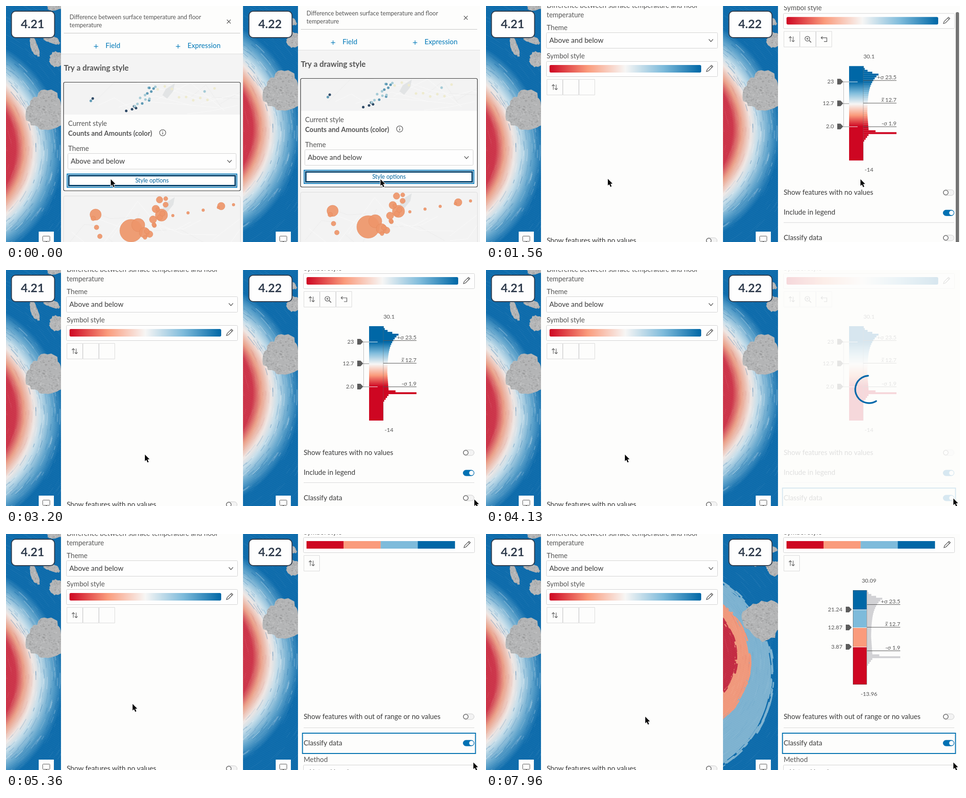
Recreate the animation shown at these times as an HTML page with a canvas. Size 1000 by 500 pixels, loop 8000 ms.

```html
<!DOCTYPE html>
<html lang="en">
<head>
<meta charset="utf-8">
<title>Style options comparison</title>
<style>
html, body { margin: 0; width: 100%; height: 100%; overflow: hidden; background: #fdfdfd; }
canvas { display: block; width: 1000px; height: 500px; }
</style>
</head>
<body>
<canvas id="stage" width="1000" height="500"></canvas>
<script>
const LOOP = 8000, TAU = Math.PI * 2;
const FONT = 'Lato, "Open Sans", sans-serif';
const INK = '#3a3a3a', SOFT = '#555', BLUE = '#0079b8', PAPER = '#fdfdfc';
const CLASSES = ['#ce0622', '#fa9b7c', '#7ebbdb', '#0067a6'];
const RAMP = ['#ce0622', '#fa9b7c', '#f7f6f5', '#7ebbdb', '#0067a6'];

let g = document.getElementById('stage').getContext('2d');

const clamp = v => Math.max(0, Math.min(1, v));
const span = (t, a, b) => clamp((t - a) / (b - a));
const mix = (a, b, p) => a + (b - a) * p;
const ease = p => p * p * (3 - 2 * p);
const easeOut = p => 1 - (1 - p) ** 3;

function rng(seed) {
  return () => {
    seed = (seed + 0x6D2B79F5) | 0;
    let v = Math.imul(seed ^ (seed >>> 15), 1 | seed);
    v = (v + Math.imul(v ^ (v >>> 7), 61 | v)) ^ v;
    return ((v ^ (v >>> 14)) >>> 0) / 4294967296;
  };
}

// ---- drawing helpers ----
function text(s, x, y, size, color = SOFT, align = 'left', weight = 400) {
  g.font = `${weight} ${size}px ${FONT}`;
  g.fillStyle = color;
  g.textAlign = align;
  g.fillText(s, x, y + size * 0.35);
}

function rect(x, y, w, h, fill) {
  g.fillStyle = fill;
  g.fillRect(x, y, w, h);
}

function box(x, y, w, h, stroke, width = 1, radius = 2, fill) {
  g.beginPath();
  g.roundRect(x, y, w, h, radius);
  if (fill) { g.fillStyle = fill; g.fill(); }
  if (stroke) { g.strokeStyle = stroke; g.lineWidth = width; g.stroke(); }
}

function trace(points) {
  g.beginPath();
  for (let i = 0; i < points.length; i += 2) g.lineTo(points[i], points[i + 1]);
}

function line(points, color, width = 1, closed = false) {
  trace(points);
  if (closed) g.closePath();
  g.strokeStyle = color;
  g.lineWidth = width;
  g.stroke();
}

function shape(points, fill) {
  trace(points);
  g.fillStyle = fill;
  g.fill();
}

function arc(x, y, r, from, to, color, width) {
  g.beginPath();
  g.arc(x, y, r, from, to);
  g.strokeStyle = color;
  g.lineWidth = width;
  g.stroke();
}

function disc(x, y, r, fill) {
  g.beginPath();
  g.arc(x, y, r, 0, TAU);
  g.fillStyle = fill;
  g.fill();
}

const ring = (x, y, r, color, width = 1) => arc(x, y, r, 0, TAU, color, width);

function gradient(x0, y0, x1, y1) {
  const grad = g.createLinearGradient(x0, y0, x1, y1);
  RAMP.forEach((c, i) => grad.addColorStop(i / 4, c));
  return grad;
}

function at(x, y, draw) {
  g.save();
  g.translate(x, y);
  draw();
  g.restore();
}

function clipped(x, y, w, h, draw, radius = 0) {
  g.save();
  g.beginPath();
  g.roundRect(x, y, w, h, radius);
  g.clip();
  draw();
  g.restore();
}

// ---- globe strip ----
function land(cx, cy, rx, ry, tilt, rand) {
  const pts = [], phase = rand() * TAU;
  for (let a = 0; a < TAU; a += 0.16) {
    const r = 0.92 + 0.1 * Math.sin(3 * a + phase) + (rand() - 0.5) * 0.16;
    pts.push(rx * r * Math.cos(a), ry * r * Math.sin(a));
  }
  at(cx, cy, () => {
    g.rotate(tilt);
    shape(pts, '#b4b5b6');
    g.clip();
    for (let i = 0; i < rx * ry * 0.3; i++) {
      const v = rand() < 0.55 ? 225 : 105;
      rect((rand() * 2 - 1) * rx, (rand() * 2 - 1) * ry, 1 + rand() * 3, 1 + rand() * 2, `rgba(${v},${v},${v},.2)`);
    }
  });
}

// A flat class area whose edge is frayed along the ring.
function classDisc(cx, cy, r, fray, color, rand) {
  disc(cx, cy, r, color);
  for (let i = 0; i < 90; i++) {
    const a = mix(-1.2, 1.2, rand());
    arc(cx, cy, r + fray * (rand() - 0.3), a, a + 0.02 + rand() * 0.12, color, 1.5 + rand() * 3);
  }
}

function makeMap(classed) {
  const c = document.createElement('canvas'), stage = g, rand = rng(7);
  c.width = 116;
  c.height = 541;
  g = c.getContext('2d');
  const ocean = '#0d6bab';
  rect(0, 0, 116, 541, ocean);
  if (classed) {
    classDisc(-123, 338, 224, 10, '#7db2d0', rand);
    classDisc(-98, 311, 153, 5, '#f0987b', rand);
    classDisc(-91, 301, 116, 8, '#c32a42', rand);
  } else {
    const grad = g.createRadialGradient(-130, 299, 0, -130, 305, 252);
    const stops = { 0: '#c4213d', 150: '#cc3449', 168: '#ea9f88', 189: '#efe6e3', 203: '#c6deea', 228: '#5fa3cb', 252: ocean };
    for (const r in stops) grad.addColorStop(r / 252, stops[r]);
    rect(0, 0, 116, 541, grad);
  }
  // Current-like streaks that follow the rings.
  for (let i = 0; i < 1300; i++) {
    const r = mix(130, 400, rand()), a = mix(-1.2, 1.2, rand());
    const halo = !classed && r > 186 && r < 245;
    const alpha = rand() * (halo ? 0.3 : 0.1);
    const tint = rand() < 0.5 ? '255,255,255' : r < 186 ? '170,60,70' : '10,95,160';
    arc(-130, 305, r, a, a + 0.03 + rand() * 0.12, `rgba(${tint},${alpha})`, halo ? 1.6 : 1);
  }
  for (let y = -60; y < 541; y += 4) line([0, y + 60, 116, y], 'rgba(255,255,255,.045)');
  land(84, 223, 44, 45, 0, rand);
  land(109, 113, 20, 17, 0, rand);
  land(60, 86, 8, 25, -0.35, rand);
  land(102, 2, 18, 8, 0, rand);
  land(97, 72, 20, 8, 0.3, rand);
  g = stage;
  return c;
}

const smoothMap = makeMap(false), classMap = makeMap(true);

function strip(X, shift, label, blend) {
  clipped(X, 0, 116, 500, () => {
    g.drawImage(smoothMap, X, -shift);
    g.globalAlpha = blend;
    g.drawImage(classMap, X, -shift);
  });
  const bx = X ? X + 12 : 11;
  box(bx + 0.5, 11, 91, 56, '#2e3b4c', 2, 9, '#fefefe');
  text(label, bx + 45, 38, 25, '#303c4d', 'center', 700);
  rect(X + 69, 478, 32, 22, '#fefefe');
  box(X + 77.5, 487.5, 15, 11, '#555', 1, 1);
  rect(X + 84, 498, 2, 2, '#555');
}

// ---- small parts ----
function select(x, y, w, label) {
  box(x + 0.5, y + 0.5, w - 1, 33, '#d2d2d2', 1, 2, '#fefefe');
  text(label, x + 6.5, y + 16.5, 15, INK);
  const cx = x + w - 14.5, cy = y + 17;
  line([cx - 4.5, cy - 2.5, cx, cy + 2.5, cx + 4.5, cy - 2.5], '#555', 1.2);
}

function toggle(x, y, on) {
  box(x + 0.5, y - 6, 23, 12, on ? '#006aab' : '#cdcdcd', 1, 6, on ? '#0071b3' : '#f3f3f3');
  disc(x + (on ? 18 : 6), y, 4.8, '#fff');
  if (!on) ring(x + 6, y, 5, '#707070', 1.5);
}

function pencil(x, y) {
  at(x, y, () => {
    g.rotate(Math.PI / 4);
    line([-2, -8, 2, -8, 2, 5, 0, 9, -2, 5], '#444', 1.1, true);
    line([-2, -5.5, 2, -5.5], '#444');
  });
}

function sortIcon() {
  for (const d of [1, -1]) {
    line([-3 * d, 5.5 * d, -3 * d, -5.5 * d], '#555', 1.1);
    line([-6 * d, -2.5 * d, -3 * d, -5.5 * d, 0, -2.5 * d], '#555', 1.1);
  }
}

function zoomIcon() {
  ring(-1, -1, 5, '#555', 1.2);
  line([3, 3, 7, 7], '#555', 1.6);
  rect(-3.5, -1.5, 5, 1, '#555');
  rect(-1.5, -3.5, 1, 5, '#555');
}

function undoIcon() {
  line([-3, -6, -6, -3, -3, 0], '#555', 1.2);
  line([-6, -3, 6, -3, 6, 5, 0, 5], '#555', 1.2);
}

function pointer(x, y, points, fill, edge, width) {
  at(x, y, () => {
    g.lineJoin = 'round';
    line(points, edge, width, true);
    shape(points, fill);
  });
}

const arrow = (x, y) =>
  pointer(x, y, [0, 0, 0, 14, 3.1, 11.3, 5.6, 16.8, 8, 15.7, 5.6, 10.3, 9.9, 10], '#0a0a0a', '#fff', 2);
const hand = (x, y) =>
  pointer(x, y, [-3, 1, 0, 1, 0.5, 6, 5, 7, 7.5, 9, 5.5, 16, -2, 16, -6.5, 9.5, -2.5, 11], '#fff', '#111', 2.2);

// ---- first panel ----
function cardMap(y, h, seed, marks) {
  const rand = rng(seed);
  clipped(122, y, 372, h, () => {
    rect(122, y, 372, h, '#f3f3f3');
    for (let i = 0; i < 12; i++) {
      const x = 122 + rand() * 372, w = 60 + rand() * 100;
      line([x, y + rand() * h, x + w / 2, y + rand() * h, x + w, y + rand() * h], i % 3 ? '#fafafa' : '#ececec');
    }
    shape([330, y + 27, 337, y + 14, 356, y + 2, 353, y + 18, 340, y + 34], '#e2e4e5');
    marks(rand);
  });
}

function dots(rand) {
  const dot = (x, y, c) => disc(x, y, 2.7, c);
  dot(183, 196, '#2f4a66');
  dot(179, 201, '#5f9ab5');
  dot(419, 181, '#a5cbd6');
  for (let i = 0; i < 20; i++) {
    const p = i / 19;
    dot(mix(246, 305, p) + rand() * 22, mix(228, 168, p) + (rand() - 0.5) * 14,
      p < 0.3 ? '#2f4a66' : rand() < 0.6 ? '#5f9ab5' : '#a5cbd6');
  }
  for (let i = 0; i < 9; i++) dot(mix(320, 440, i / 8), mix(170, 206, rand()), '#eeebcf');
}

const BUBBLES = [[264, 476, 24], [279, 464, 14], [292, 480, 11], [189, 442, 12], [328, 443, 13], [316, 430, 8], [454, 424, 8]];

function bubbles(rand) {
  const bubble = (x, y, r) => {
    disc(x, y, r, 'rgba(238,150,106,.92)');
    ring(x, y, r, 'rgba(222,132,88,.6)', 0.8);
  };
  for (const b of BUBBLES) bubble(...b);
  for (let i = 0; i < 12; i++) bubble(mix(283, 325, i / 11) + rand() * 22, mix(492, 408, i / 11) + (rand() - 0.5) * 12, 4 + rand() * 4);
  for (let i = 0; i < 5; i++) bubble(mix(352, 480, i / 4), mix(444, 421, i / 4), 3);
  for (let i = 0; i < 3; i++) bubble(184 + i * 7, mix(450, 488, i / 2), 5);
}

function stylePanel() {
  rect(116, -20, 384, 540, '#f4f4f4');
  rect(116, -20, 384, 121, PAPER);
  text('Difference between surface temperature and floor', 134, 24, 12.6);
  text('temperature', 134, 41, 12.6);
  for (const d of [4, -4]) line([470 - d, 29, 470 + d, 37], '#555', 1.1);
  rect(122, 57, 372, 1, '#c4c4c4');
  for (const [x, label] of [[190, 'Field'], [363, 'Expression']]) {
    rect(x - 4.5, 85, 9, 1.2, BLUE);
    rect(x - 0.6, 81, 1.2, 9, BLUE);
    text(label, x + 20, 84, 14.7, BLUE);
  }
  rect(116, 101, 384, 1, '#dedede');
  text('Try a drawing style', 122, 131, 16.4, SOFT, 'left', 700);

  box(121.5, 161.5, 373, 230, null, 1, 3, PAPER);
  cardMap(162, 68, 3, dots);
  box(121.5, 161.5, 373, 230, '#333', 1.2, 3);
  text('Current style', 131, 249, 14.4);
  text('Counts and Amounts (color)', 131, 270, 14.4, SOFT, 'left', 700);
  ring(330.5, 268.5, 6.5, '#444', 1.1);
  rect(330, 267.5, 1.2, 4.5, '#444');
  rect(330, 264.5, 1.2, 1.4, '#444');
  text('Theme', 131, 302, 14.6);
  select(130, 312, 356, 'Above and below');
  box(129, 356, 358, 28, '#1580bd', 2, 0, '#fff');
  box(132.5, 359.5, 351, 21, '#05426c', 3, 0, '#fff');
  text('Style options', 308, 370, 12.4, '#00639c', 'center');

  cardMap(403, 120, 11, bubbles);
  box(121.5, 402.5, 373, 130, '#dcdcdc', 1, 3);
}

// ---- options panel ----
function binWidth(i) {
  if (i > 39) return 0;
  if (i > 35) return 14 - 3 * (i - 35);
  const top = i < 4 ? 32 * (i / 4) ** 2 + 1 : 8 + 24 * Math.exp((4 - i) / 5);
  return Math.max(top + 3 * span(i, 24, 33), 70 * Math.exp(-((i - 35) ** 2)));
}

function histogram(y0, classed) {
  const x = classed ? 274 : 266, end = x + 100, knob = classed ? 259 : 241;
  text(classed ? '30.09' : '30.1', 308, y0 - 20, 12, SOFT, 'center');
  text(classed ? '-13.96' : '-14', 308, y0 + 220, 12, SOFT, 'center');

  const fill = gradient(0, y0 + 128, 0, y0 + 33);
  for (let i = 0; i < 50; i++) rect(x + 30, y0 + i * 4, binWidth(i), 4, classed ? '#d2d2d5' : fill);
  const cuts = classed ? [41, 79, 120] : [33, 79, 128];
  const labels = classed ? ['21.24', '12.87', '3.87'] : ['23', '12.7', '2.0'];
  if (classed) {
    const edges = [0, ...cuts, 200];
    for (let i = 0; i < 4; i++) rect(x, y0 + edges[i], 29, edges[i + 1] - edges[i], CLASSES[3 - i]);
    box(x + 0.5, y0 + 0.5, 29, 199, 'rgba(90,90,90,.55)', 1, 0);
  } else {
    rect(x, y0, 30, 200, fill);
    rect(x + 29.5, y0, 1, 200, 'rgba(110,110,110,.45)');
    rect(254, y0 + 33, 1, 95, '#bdbdbd');
  }
  cuts.forEach((cut, i) => {
    const y = y0 + cut;
    text(labels[i], knob - 7, y, 12, SOFT, 'right');
    if (!classed) rect(253, y, 13, 1, '#8a8a8a');
    rect(x, y, classed ? 29 : 18, 1, '#f4f4f4');
    shape([knob, y - 6, knob + 7, y - 6, knob + 12.5, y, knob + 7, y + 6, knob, y + 6], '#5c5c5c');
  });
  for (const [m, label] of [[30, '+σ 23.5'], [78, '12.7'], [128, '-σ 1.9']]) {
    rect(x + 30, y0 + m, 70, 1, '#555');
    text(label, end, y0 + m - 6, 12, SOFT, 'right');
  }
  g.font = 'italic 12px "Liberation Serif", serif';
  g.textAlign = 'left';
  g.fillText('x', end - 32, y0 + 76);
  rect(end - 31, y0 + 67.5, 5, 1, SOFT);
}

function rampBar(classed) {
  if (classed) CLASSES.forEach((c, i) => rect(134 + i * 78.25, 117, 78.5, 16, c));
  else box(134, 117, 320, 16, null, 1, 3, gradient(134, 0, 454, 0));
}

function optionsPanel(o) {
  rect(116, -30, 384, 700, PAPER);
  if (o.wrapped) text('erature', 128, 11, 14.5);
  else {
    text('Difference between surface temperature and floor', 128, -9, 14.5);
    text('temperature', 128, 11, 14.5);
  }
  text('Theme', 128, 38, 14.6);
  select(127, 48, 362, 'Above and below');
  text('Symbol style', 128, 98, 14.5);
  box(127.5, 109.5, 361, 32, '#d2d2d2', 1, 2, '#fefefe');
  if (o.ramp) rampBar(o.classed);
  pencil(471.5 + (o.classed ? 1 : 0), 124.5);
  const icons = [sortIcon, zoomIcon, undoIcon];
  for (let i = 0; i < (o.classed ? 1 : 3); i++) {
    box(128.5 + i * 34, 147.5, 33, 33, '#dadada', 1, 0);
    if (i === 0 || o.icons) at(145 + i * 34, 164, icons[i]);
  }
  if (o.hover) rect(128, 421, 360, 40, '#f1f1f3');
  if (o.hist) histogram(221, o.classed);
  if (o.hover) rect(299, 446, 18, 1, SOFT);

  text('Show features with ' + (o.classed ? 'out of range or no values' : 'no values'), 128, 489, 14.7, INK);
  toggle(464, 489, false);
  const y = o.classed ? 545 : 585;
  rect(128, y - 33, 360, 1, '#d8d8d8');
  if (o.classed) {
    text('Method', 128, 580, 14.6);
    select(127, 591, 362, '');
    text('Natural breaks', 140, 606.5, 14.7, INK);
  } else {
    text('Include in legend', 128, 531, 14.7, INK);
    toggle(464, 532, true);
  }
  text('Classify data', 128, y, 14.7, INK);
  toggle(464, y, o.checked);
  if (o.checked) box(125.5, y - 21, 365, 43, '#0070b0', 2, 0);
  g.globalAlpha = 0.85 * o.veil;
  rect(116, 90, 384, 520, PAPER);
}

function panel(X, dy, slide, draw) {
  clipped(X + 116, 0, 384, 500, () => {
    g.translate(X + 50 * (1 - slide), dy);
    g.globalAlpha = 0.5 + 0.5 * slide;
    draw();
  });
}

function spinner(t) {
  const turn = (t - 4130) / 720 * TAU;
  g.lineCap = 'round';
  arc(808, 253, 29, turn + 1.02, turn + 4.65, '#0068aa', 3.4);
  g.lineCap = 'butt';
}

// ---- pointer paths: time, x, y ----
const LEFT_PATH = [[30, 221, 367], [600, 257, 367], [2160, 257, 366], [2900, 293, 391], [4130, 293, 391],
  [4560, 207, 348], [4860, 226, 325], [5180, 268, 373], [5360, 267, 360], [5500, 267, 360], [6100, 338, 378],
  [7700, 338, 378], [7960, 336, 387]];
const RIGHT_PATH = [[2160, 790, 367], [2900, 988, 486], [3440, 988, 486], [3460, 986, 484]];

function along(path, t) {
  const i = path.findIndex(p => p[0] >= t);
  const b = path.at(i), a = path[Math.max(0, i - 1)];
  if (i < 1) return b.slice(1);
  const p = ease(span(t, a[0], b[0]));
  return [mix(a[1], b[1], p), mix(a[2], b[2], p)];
}

function draw(t) {
  const open = t >= 60, slide = easeOut(span(t, 60, 210));
  const classed = t >= 4820, loading = t >= 4060 && !classed;
  const scroll = -102 * easeOut(span(t, 1390, 1690));
  const hover = t >= 1640 && t < 2200;

  rect(0, 0, 1000, 500, PAPER);
  strip(0, 0, '4.21', 0);
  strip(500, 41, '4.22', span(t, 5560, 5880));

  if (open) {
    panel(0, 8, slide, () => optionsPanel({ ramp: t >= 1200, veil: 0 }));
    panel(500, scroll, slide, () => optionsPanel({
      wrapped: true, ramp: t >= 360, icons: t >= 360, hover, classed,
      hist: t >= 420 && (!classed || t >= 5540),
      checked: t >= 3660, veil: loading ? span(t, 4040, 4120) : 0
    }));
  } else {
    panel(0, 0, 1, stylePanel);
    panel(500, -8, 1, stylePanel);
  }

  g.globalAlpha = span(t, 1400, 1440) * (1 - span(t, 2500, 2700));
  box(991, 13, 7, 500, null, 1, 3, '#747474');
  g.globalAlpha = 1;
  if (loading) spinner(t);

  arrow(...along(LEFT_PATH, t));
  const [x, y] = along(RIGHT_PATH, t);
  if (hover) hand(x + 2, y + 1);
  else arrow(x, y);
}

let start;
function tick(now) {
  start ??= now;
  draw((now - start) % LOOP);
  requestAnimationFrame(tick);
}
draw(0);
requestAnimationFrame(tick);
</script>
</body>
</html>
```
